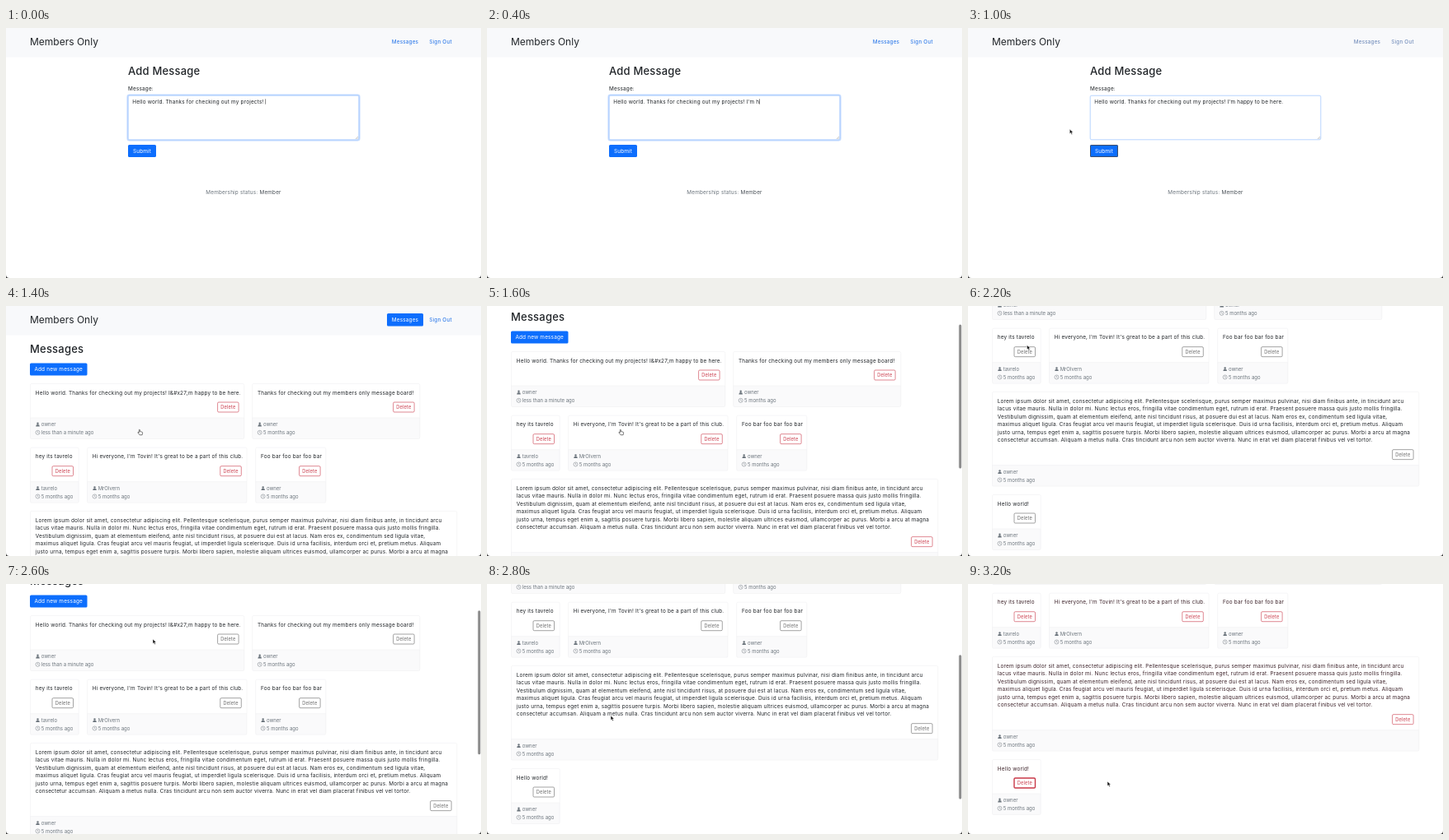
These frames come from a looping animation (576x304 px, 3400 ms). An HTML page:

```html
<!DOCTYPE html>
<html lang="en">
<head>
<meta charset="utf-8">
<title>Members Only</title>
<style>
  html, body { margin: 0; width: 100%; height: 100%; overflow: hidden; background: #fff; }
  svg { display: block; width: 100vw; height: 100vh; }
  text { font: 6.4px Inter, "Open Sans", sans-serif; letter-spacing: .19px; fill: var(--ink); white-space: pre; }
  .brand { font-size: 12px; letter-spacing: 0; fill: #212529; }
  .title { font-size: 13px; font-weight: 500; letter-spacing: .2px; fill: #212529; }
  .muted { fill: #6c757d; }
  .meta { font-size: 6px; letter-spacing: 0; fill: #6c757d; }
  .small { font-size: 5.6px; letter-spacing: .2px; }
  .link { fill: var(--link); }
  .white { fill: #fff; }
  .mid { text-anchor: middle; }
  .danger { fill: var(--danger); }
</style>
</head>
<body>
<svg id="stage" viewBox="0 0 576 304" preserveAspectRatio="none"></svg>
<script>
const NS = 'http://www.w3.org/2000/svg';
const stage = document.getElementById('stage');
const BLUE = '#0d6efd', LOOP = 3400, VIEW = 304, PAGE = 528;

function add(parent, tag, attrs = {}, content = '') {
  const el = document.createElementNS(NS, tag);
  for (const key in attrs) el.setAttribute(key, attrs[key]);
  el.textContent = content;
  return parent.appendChild(el);
}
const group = parent => add(parent, 'g');
const rect = (parent, x, y, width, height, fill, more = {}) =>
  add(parent, 'rect', { x, y, width, height, fill, ...more });
// y is the middle of the line
const label = (parent, x, y, content, cls = '', drop = 2.2) =>
  add(parent, 'text', { x, y: y + drop, class: cls }, content);
const show = (el, on) => el.setAttribute('display', on ? 'inline' : 'none');
const move = (el, x, y) => el.setAttribute('transform', `translate(${x} ${y})`);

function navbar(parent, active) {
  rect(parent, 0, 0, 576, 35.5, '#f8f9fb');
  label(parent, 29, 17, 'Members Only', 'brand', 4.2);
  if (active) rect(parent, 462, 9, 44, 15.5, BLUE, { rx: 1.6 });
  label(parent, 484, 16.5, 'Messages', active ? 'white mid' : 'link mid');
  label(parent, 527, 16.5, 'Sign Out', 'link mid');
}

function status(parent, y) {
  const line = label(parent, 288, y, '', 'muted mid');
  add(line, 'tspan', {}, 'Membership status: ');
  add(line, 'tspan', { fill: '#495057' }, 'Member');
}

// Form page
const form = group(stage);
navbar(form, false);
label(form, 148, 52, 'Add Message', 'title', 4.6);
label(form, 148, 74, 'Message:');
const glow = rect(form, 147.3, 81.3, 281.4, 55.4, 'none',
  { rx: 2.4, stroke: BLUE, 'stroke-opacity': .25, 'stroke-width': 1.6 });
rect(form, 148.2, 82.2, 279.6, 53.6, '#fff', { rx: 1.6, stroke: '#86b7fe', 'stroke-width': .6 });
add(form, 'path', { d: 'M424 135l3-3M425.7 135l1.3-1.3', stroke: '#777', 'stroke-width': .4 });
const entry = label(form, 153.3, 89.5, '');
const caret = rect(form, 0, 86.3, .6, 6.4, '#333');
rect(form, 148, 142, 34, 15, BLUE, { rx: 1.6 });
const ring = rect(form, 148.5, 142.5, 33, 14, 'none', { rx: 1.2, stroke: '#3f4d68', 'stroke-width': 1 });
label(form, 165, 149.5, 'Submit', 'white mid');
status(form, 200);

// Message list page
const list = group(stage);
navbar(list, true);
label(list, 29, 52, 'Messages', 'title', 4.6);
rect(list, 29, 69.5, 69.5, 15, BLUE, { rx: 1.6 });
label(list, 63.7, 77, 'Add new message', 'white mid');

const LINE = 9.55;
function card(left, right, y, lines, user, age = '5 months ago') {
  const g = group(list), end = y + (lines.length - 1) * LINE;
  const top = y - 11, foot = end + 30.5, bottom = end + 56;
  rect(g, left, foot, right - left, bottom - foot, '#fafafb');
  rect(g, left, top, right - left, bottom - top, 'none',
    { rx: 1.6, stroke: '#ececee', 'stroke-width': .5 });
  add(g, 'path', { d: `M${left} ${foot}H${right}`, stroke: '#ececee', 'stroke-width': .5 });
  lines.forEach((text, i) => label(g, left + 6.3, y + i * LINE, text));
  const button = rect(g, right - 32.2, end + 11.5, 25.5, 12, '#fff',
    { rx: 1.3, style: 'stroke:var(--danger)', 'stroke-width': .6 });
  label(g, right - 19.4, end + 17.5, 'Delete', 'small mid danger', 2);
  const x = left + 9, head = end + 38.6, clock = end + 48.3;
  add(g, 'circle', { cx: x, cy: head - 1.3, r: 1.2, fill: '#6c757d' });
  add(g, 'path', { d: `M${x - 2.3} ${head + 2.3}q0-2.3 2.3-2.3t2.3 2.3z`, fill: '#6c757d' });
  add(g, 'circle', { cx: x, cy: clock, r: 2.5, fill: 'none', stroke: '#6c757d', 'stroke-width': .5 });
  add(g, 'path', { d: `M${x} ${clock - 1.5}v1.6l1.1.7`, fill: 'none', stroke: '#6c757d', 'stroke-width': .5 });
  label(g, left + 13.2, head, user, 'meta');
  label(g, left + 13.2, clock, age, 'meta');
  return button;
}

const GREETING = 'Hello world. Thanks for checking out my projects! ';
const TYPED = GREETING + "I'm happy to be here.";
const LOREM = [
  'Lorem ipsum dolor sit amet, consectetur adipiscing elit. Pellentesque scelerisque, purus semper maximus pulvinar, nisi diam finibus ante, in tincidunt arcu',
  'lacus vitae mauris. Nulla in dolor mi. Nunc lectus eros, fringilla vitae condimentum eget, rutrum id erat. Praesent posuere massa quis justo mollis fringilla.',
  'Vestibulum dignissim, quam at elementum eleifend, ante nisl tincidunt risus, at posuere dui est at lacus. Nam eros ex, condimentum sed ligula vitae,',
  'maximus aliquet ligula. Cras feugiat arcu vel mauris feugiat, ut imperdiet ligula scelerisque. Duis id urna facilisis, interdum orci et, pretium metus. Aliquam',
  'justo urna, tempus eget enim a, sagittis posuere turpis. Morbi libero sapien, molestie aliquam ultrices euismod, ullamcorper ac purus. Morbi a arcu at magna',
  'consectetur accumsan. Aliquam a metus nulla. Cras tincidunt arcu non sem auctor viverra. Nunc in erat vel diam placerat finibus vel vel tortor.'
];
card(29.5, 288.8, 105.5, [TYPED.replace("'", '&#x27;')], 'owner', 'less than a minute ago');
card(298.7, 501.8, 105.5, ['Thanks for checking out my members only message board!'], 'owner');
card(29.5, 88.2, 183.2, ['hey its tavrelo'], 'tavrelo');
card(98.5, 292, 183.2, ["Hi everyone, I'm Tovin! It's great to be a part of this club."], 'MrOlvern');
card(302.7, 387.8, 183.2, ['Foo bar foo bar foo bar'], 'owner');
card(29.5, 546.8, 260.4, LOREM, 'owner');
const lastDelete = card(29.5, 88.2, 385.5, ['Hello world!'], 'owner');
status(list, 490);

// Scrollbar, window corners and pointers
const bar = rect(stage, 572.3, 0, 3, VIEW * VIEW / PAGE, '#8a8a8a', { rx: 1.5 });
add(stage, 'path', { d: 'M0 300q0 4 4 4H0zM576 300q0 4-4 4h4z', fill: '#333' });
const outline = { fill: '#111', stroke: '#fff', 'stroke-width': .5 };
const arrow = add(stage, 'path', { d: 'M0 0v5.6l1.3-1.2 1 2.2 1.1-.5-1-2.1h1.8z', ...outline });
const hand = add(stage, 'path', {
  d: 'M0 .6q.6-1 1.1 0v2l2.6.6q.8.3.6 1.2l-.5 2.4H.8L-1.4 4q0-.9.7-.6l.7.7z',
  fill: '#fff', stroke: '#222', 'stroke-width': .6
});

// One step per 200 ms, the first one is held for 400 ms
const typing = chars => ({ chars, caret: true });
const scroll = (y, more) => ({ scroll: y, ...more });
const GREY = '#666', full = TYPED.length;
const SUBMIT = [161.3, 150];
const STEPS = [
  typing(GREETING.length),
  typing(GREETING.length + 5),
  typing(GREETING.length + 12),
  typing(full),
  { chars: full, focus: true, link: '#6683b5', arrow: [123.3, 123] },
  { chars: full, focus: true, link: '#6683b5', hand: SUBMIT },
  scroll(0, { hand: SUBMIT }),
  scroll(39, { bar: true, hand: SUBMIT }),
  scroll(178, { bar: true, hand: SUBMIT, danger: GREY }),
  scroll(145, { bar: true, arrow: [118, 102], danger: GREY }),
  scroll(145, { arrow: [71.5, 47.5], danger: GREY }),
  scroll(140, { bar: true, arrow: [140, 62], danger: GREY }),
  scroll(56, { bar: true, arrow: [178, 67], danger: GREY }),
  scroll(150, { bar: true, arrow: [150, 160], danger: GREY }),
  scroll(161, { hand: [70, 240], focus: true }),
  scroll(161, { arrow: [169, 240], focus: true, ink: '#3c2229' })
];

function render(time) {
  const step = STEPS[Math.max(0, Math.floor((time % LOOP - 200) / 200))];
  const onList = step.scroll !== undefined;
  show(form, !onList);
  show(list, onList);
  stage.style.setProperty('--ink', step.ink || '#212529');
  stage.style.setProperty('--link', step.link || '#1f70e8');
  stage.style.setProperty('--danger', step.danger || '#c93848');
  if (onList) {
    move(list, 0, -step.scroll);
    bar.setAttribute('y', step.scroll * VIEW / PAGE);
    lastDelete.setAttribute('stroke-width', step.focus ? 1.4 : .6);
  } else {
    entry.textContent = TYPED.slice(0, step.chars);
    caret.setAttribute('x', 153.3 + entry.getComputedTextLength());
  }
  show(caret, step.caret);
  show(ring, step.focus);
  show(glow, !step.focus);
  show(bar, step.bar);
  for (const [el, at] of [[arrow, step.arrow], [hand, step.hand]]) {
    show(el, at);
    if (at) move(el, ...at);
  }
}

const start = performance.now();
function tick() {
  render(performance.now() - start);
  requestAnimationFrame(tick);
}
tick();
</script>
</body>
</html>
```
